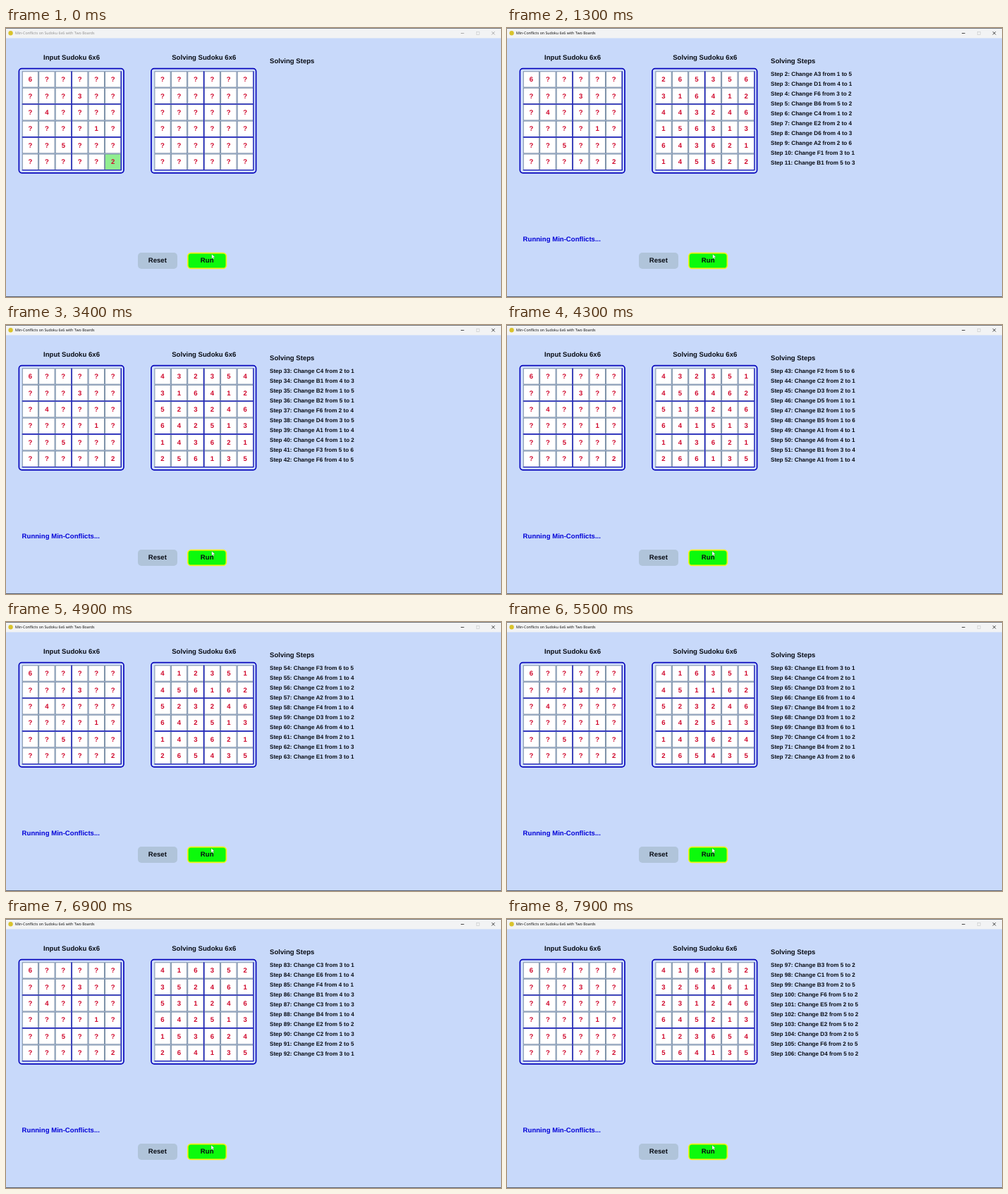
Write an HTML page that moves like this. It is 702 px wide and 382 px high and loops after 8000 ms.

```html
<!DOCTYPE html>
<html lang="en">
<head>
<meta charset="utf-8">
<title>Min-Conflicts</title>
<style>
  html, body { margin: 0; width: 100%; height: 100%; overflow: hidden; background: #c8d9fa; }
  svg { display: block; width: 702px; height: 382px; }
  text { font: bold 9.6px "Liberation Sans", Arial, sans-serif; fill: #080c14; text-rendering: geometricPrecision; white-space: pre; }
  .mid { text-anchor: middle; }
  .digit { fill: #d0082c; }
  .step { font-size: 8.12px; }
  .caption { font: 5.3px "Open Sans", "Noto Sans", sans-serif; }
</style>
</head>
<body>
<svg id="stage" viewBox="0 0 702 382"></svg>
<script>
const LOOP = 8000, TICK = 100, PITCH = 23.45, SHOWN = 10;
const ROWS = 'ABCDEF';
const GIVEN = ['6?????', '???3??', '?4????', '????1?', '??5???', '?????2'];
const START = ['221356', '516415', '443146', '456314', '623611', '345523'];

// Each move is row, column, new value; the old value follows from the board.
const MOVES = [
  'E52 A35 D11 F62 B62 C42 E24 D63 A26 F11 B13 D32 A64 F25',
  'C31 F44 F12 C33 A11 F41 C15 C21 B45 B44',
  'D16 A23 F53 E11 C22 D24 A32 B14',
  'C41 B13 B25 B21 F64 D45 A14 C42 F36 F65',
  'F26 C21 D31 D51 B25 B56 A11 A61 B14 A14',
  'B42 F35 A64 C22 A21 F44 D32 A61 B41 E13',
  'E11 C41 D31 E64 B42 D32 B31 C42 B41 A36',
  'B32 A62 C41 E22 F34 C42 B61 E25 C21 E61',
  'C31 E64 F41 B13 C33 B44 E22 C23 E25 C31',
  'B35 E55 F15 E52',
  'B32 C12 B35 F62 E55 B22 E22 D35 F65 D42'
].join(' ').split(' ');

// Pace of the solver: [tick, steps done], with ticks where it stalls.
const PACE = [[6, 0], [22, 24], [34, 42], [43, 52], [55, 72], [69, 92], [79, 106]];
const STALLS = [42, 50, 56, 73, 76];

const stage = document.getElementById('stage');

function add(tag, attrs, content) {
  const node = document.createElementNS('http://www.w3.org/2000/svg', tag);
  for (const key in attrs) node.setAttribute(key, attrs[key]);
  if (content) node.textContent = content;
  stage.appendChild(node);
  return node;
}
const box = (x, y, width, height, fill, more) => add('rect', { x, y, width, height, fill, ...more });
const label = (x, y, content, cls = '') => add('text', { x, y, class: cls }, content);
const line = (d, stroke, width) => add('path', { d, stroke, 'stroke-width': width, fill: 'none' });

function drawBoard(left, rows) {
  const cells = [], top = 61.3, side = 6 * PITCH;
  box(left - 4.4, top - 3.7, 148.6, 148.2, '#d3e1fb', { rx: 4, stroke: '#0808bc', 'stroke-width': 1.7 });
  for (let r = 0; r < 6; r++) {
    for (let c = 0; c < 6; c++) {
      const x = left + c * PITCH, y = top + r * PITCH;
      const tile = box(x + .5, y + .5, 22.3, 22.3, '#fff', { stroke: '#71869e', 'stroke-width': .9 });
      const text = label(x + 11.6, y + 14.8, rows[r][c], 'mid digit');
      cells.push({ tile, text });
    }
  }
  for (const c of [3, 6]) line(`M${left + c * PITCH - .1} ${top}v${side}`, '#1c1cc4', 1.3);
  for (const r of [2, 4, 6]) line(`M${left} ${top + r * PITCH - .1}h${side}`, '#1c1cc4', 1.3);
  return cells;
}

function buildStates() {
  let board = START.join('').split('');
  const boards = [board], log = [];
  MOVES.forEach(([row, col, value], i) => {
    const at = ROWS.indexOf(row) * 6 + Number(col) - 1;
    log.push(`Step ${i + 1}: Change ${row}${col} from ${board[at]} to ${value}`);
    board = board.slice();
    board[at] = value;
    boards.push(board);
  });
  return { boards, log };
}

function stepsAt(tick) {
  if (tick <= PACE[0][0]) return 0;
  const live = (a, b) => b - a - STALLS.filter(s => s > a && s <= b).length;
  const i = PACE.findIndex(p => p[0] >= tick);
  const [t0, n0] = PACE[i - 1], [t1, n1] = PACE[i];
  return Math.round(n0 + (n1 - n0) * live(t0, tick) / live(t0, t1));
}

// Window
box(0, 0, 702, 382, '#c8d9fa');
box(0, 0, 702, 14.4, '#f2f3f4');
box(0, 0, 702, .8, '#55585c');
box(0, 381, 702, 1, '#59616f');
add('circle', { cx: 6.6, cy: 7.2, r: 3.2, fill: '#d9c32c' });
const caption = label(13, 9.4, 'Min-Conflicts on Sudoku 6x6 with Two Boards', 'caption');
const controls = [line('M645 7.5h4.6', '#000', .7), line('M688.8 5.1l4.4 4.4m0-4.4l-4.4 4.4', '#000', .7)];
box(667.2, 5.3, 4, 4, 'none', { stroke: '#c4c5c7', 'stroke-width': .6 });

// Boards and log
label(93, 45.4, 'Input Sudoku 6x6', 'mid');
label(280.8, 45.4, 'Solving Sudoku 6x6', 'mid');
label(374, 50.2, 'Solving Steps');
const input = drawBoard(22.8, GIVEN);
const solving = drawBoard(210.4, Array(6).fill('??????'));
const lines = Array.from({ length: SHOWN }, (_, i) => label(374, 67.9 + i * 14.05, '', 'step'));
const status = label(22.6, 303, 'Running Min-Conflicts...');
status.style.fill = '#0404d8';

// Buttons and pointer
box(187, 319, 56, 23, '#b0c4da', { rx: 5 });
label(214.8, 333.3, 'Reset', 'mid');
box(257.8, 319.6, 54.6, 21.8, '#0cfa0c', { rx: 4.5, stroke: '#f4f414', 'stroke-width': 1.7 });
label(285.2, 333.3, 'Run', 'mid');
const pointer = add('path', {
  d: 'M0 0v6.2l1.5-1.4 1 2.3 1-.4-1-2.3h2z',
  fill: '#fff', stroke: '#444', 'stroke-width': .25
});

const { boards, log } = buildStates();
const selected = input[35].tile;

function render(time) {
  const tick = Math.floor(time / TICK);
  const done = stepsAt(tick);
  const grey = Math.round(140 * (1 - Math.min(tick, 3) / 3));
  const ink = `rgb(${grey},${grey},${grey})`;
  caption.style.fill = ink;
  controls.forEach(c => c.setAttribute('stroke', ink));
  selected.setAttribute('fill', tick < 1 ? '#90ee90' : '#fff');
  solving.forEach((cell, i) => { cell.text.textContent = done ? boards[done][i] : '?'; });
  const first = Math.max(0, done - SHOWN);
  lines.forEach((l, i) => { l.textContent = first + i < done ? log[first + i] : ''; });
  status.setAttribute('visibility', done ? 'visible' : 'hidden');
  pointer.setAttribute('transform', `translate(${tick < 35 ? 291.8 : 291} 321.2)`);
}

const begin = performance.now();
function loop() {
  render((performance.now() - begin) % LOOP);
  requestAnimationFrame(loop);
}
render(0);
requestAnimationFrame(loop);
</script>
</body>
</html>
```
